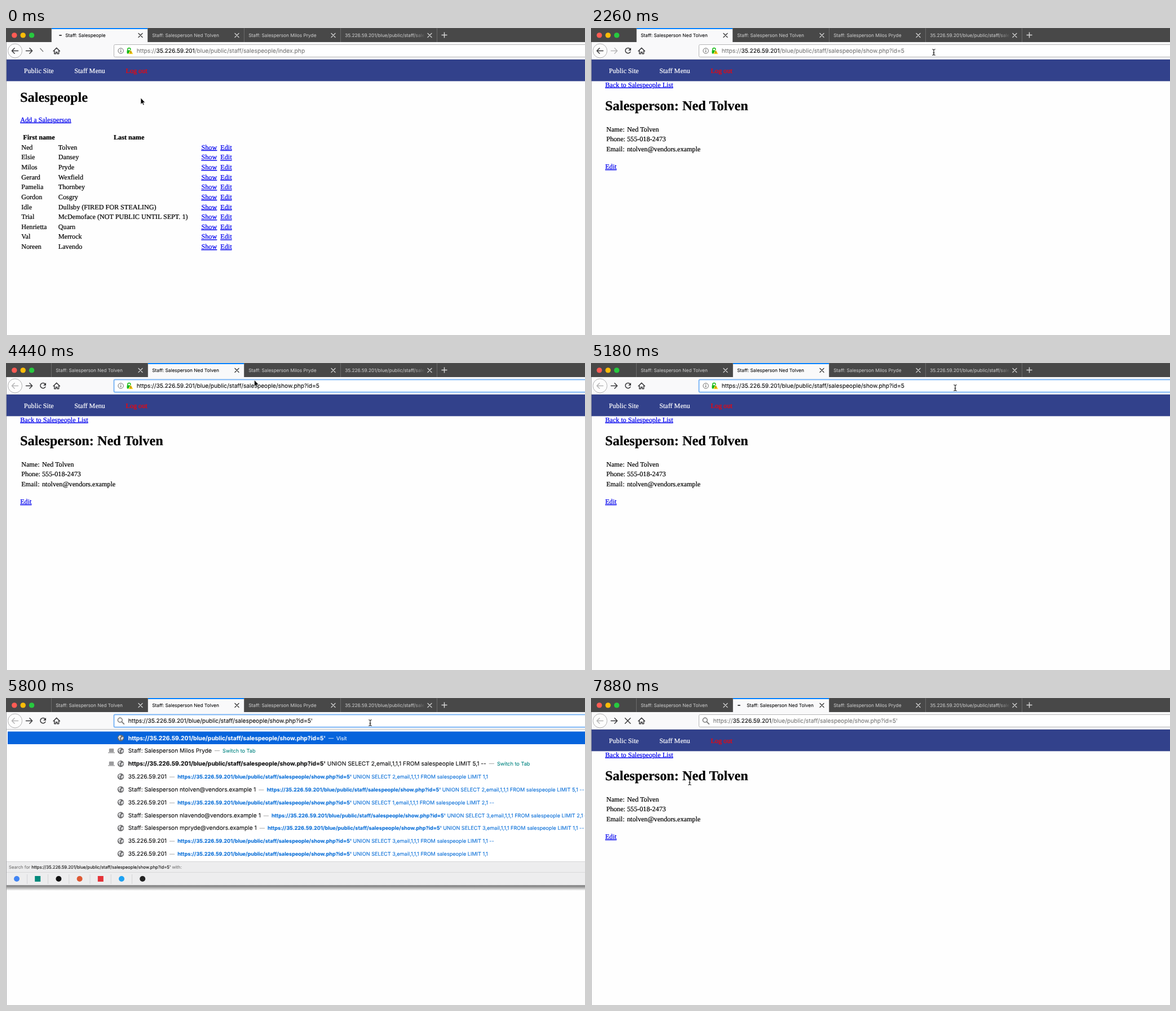
Recreate the animation shown at these times as an HTML page. Size 1027x545 px, loop 8000 ms.

```html
<!DOCTYPE html>
<html lang="en">
<head>
<meta charset="utf-8">
<title>Staff browser</title>
<style>
html, body { margin: 0; width: 100%; height: 100%; overflow: hidden; background: #fefefe; }
svg { display: block; }
text { white-space: pre; text-rendering: geometricPrecision; }
.ui { font-family: Inter, Roboto, sans-serif; stroke-width: .1px; }
.tab { font-size: 8.3px; }
.big { font-size: 10.22px; }
.big .b { font-size: 10.35px; }
.big .small { font-size: 9.13px; }
.tiny { font-size: 7.72px; }
.page { font: 12.15px "Liberation Serif", Times, serif; stroke-width: .22px; }
.h1 { font-size: 24.3px; font-weight: 700; }
.b { font-weight: 700; }
.link { text-decoration: underline; }
.icon { fill: none; stroke: #3b3b3d; stroke-width: 1.5; stroke-linecap: round; stroke-linejoin: round; }
</style>
</head>
<body>
<svg id="stage" width="1027" height="545" viewBox="0 0 1027 545"></svg>
<script>
const stage = document.getElementById('stage');
const LOOP = 8000;
const HOST = '35.226.59.201';
const PATH = '/blue/public/staff/salespeople/';
const SHOW = PATH + 'show.php?id=5';
const person = 'Ned Tolven', mail = 'ntolven@vendors.example';

const people = [
  ['Ned', 'Tolven'], ['Elsie', 'Dansey'], ['Milos', 'Pryde'], ['Gerard', 'Wexfield'],
  ['Pamelia', 'Thornbey'], ['Gordon', 'Cosgry'], ['Idle', 'Dullsby (FIRED FOR STEALING)'],
  ['Trial', 'McDemoface (NOT PUBLIC UNTIL SEPT. 1)'], ['Henrietta', 'Quarn'],
  ['Val', 'Merrock'], ['Noreen', 'Lavendo']
];

const rect = (x, y, w, h, fill, more = '') =>
  `<rect x="${x}" y="${y}" width="${w}" height="${h}" fill="${fill}" ${more}/>`;
const circle = (x, y, r, fill, more = '') =>
  `<circle cx="${x}" cy="${y}" r="${r}" fill="${fill}" ${more}/>`;
const path = (d, more = 'class="icon"') => `<path d="${d}" ${more}/>`;
// A hairline stroke in the fill colour gives the text its slightly heavy smoothing.
const ink = color => `fill="${color}" stroke="${color}"`;
const text = (x, y, s, cls, fill = '#000', more = '') =>
  `<text x="${x}" y="${y}" class="${cls}" ${ink(fill)} ${more}>${s}</text>`;
const span = (s, cls, fill, dx = 0) =>
  `<tspan class="${cls}" ${ink(fill)} dx="${dx}">${s}</tspan>`;
const at = (x, y, s) => `<g transform="translate(${x} ${y})">${s}</g>`;
const page = (x, y, s, cls = '', fill) => text(x, y, s, 'page ' + cls, fill);
const link = (x, y, s) => page(x, y, s, 'link', '#0000ee');

// Each entry changes part of the state at its time.
const steps = [
  [0, { view: 'list', active: 0, spin: 96.5, button: 'tick', back: true, fwd: true, hover: -1,
        path: PATH + 'index.php', focus: false, select: false, caret: false, drop: false,
        search: false, cursor: ['arrow', 239, 124] }],
  [300, { spin: 94, button: 'stop' }],
  [720, { spin: 0, cursor: ['arrow', 247, 124] }],
  [1110, { path: SHOW, fwd: false, spin: 96, button: 'stop' }],
  [1400, { view: 'detail', spin: 94, cursor: ['arrow', 611, 52] }],
  [1700, { spin: 0, button: 'tick', cursor: ['beam', 610, 46] }],
  [2050, { button: 'reload', cursor: ['beam', 609, 45] }],
  [2260, { cursor: ['beam', 608, 43] }],
  [2560, { focus: true, select: true }],
  [2700, { select: false, caret: true }],
  [3000, { cursor: ['beam', 627, 41] }],
  [3175, { cursor: ['arrow', 440, 27] }],
  [3350, { cursor: ['arrow', 323, 15], hover: 1 }],
  [3670, { back: false, fwd: true }],
  [3900, { active: 1, hover: -1 }],
  [5620, { search: true, path: SHOW + "'", drop: true, caret: true }],
  [5800, { caret: false }],
  [6190, { drop: false, focus: false, spin: 265, button: 'arc' }],
  [6580, { button: 'stop', spin: 267, cursor: ['beam', 175, 149] }],
  [6960, { spin: 261.5 }],
  [7290, { spin: 266 }],
  [7590, { spin: 270 }],
  [7880, { spin: 262.5 }]
];
for (let i = 0; i < 7; i++) {
  const p = i / 6, e = 1 - (1 - p) ** 2;
  const x = 350 + 296 * e, y = 24 + 20 * e;
  steps.push([4200 + 980 * p, { cursor: [y > 31 ? 'beam' : 'arrow', x, y], caret: i > 1 && i < 5 }]);
}
steps.sort((a, b) => a[0] - b[0]);

function tabs(s) {
  const who = 'Staff: Salesperson ';
  const names = [s.view === 'list' ? 'Staff: Salespeople' : who + person,
    who + person, who + 'Milos Pryde', HOST + PATH.slice(0, -6)];
  let out = rect(0, 0, 1027, 25, '#484848') + rect(0, 0, 1027, 1, '#525252');
  ['#ff5b54', '#fdbc09', '#27c93f'].forEach((c, i) => out += circle(14.8 + 15.4 * i, 12.9, 4.7, c));
  names.forEach((name, i) => {
    const x = 81 + 171 * i, on = i === s.active;
    if (on) out += rect(x, 0, 171, 25, '#f9f9fa') + rect(x, 0, 171, 2, '#0a84ff');
    else if (i === s.hover) out += rect(x, 0, 171, 25, '#5e5e5e') + rect(x, 0, 171, 1.5, '#858585');
    out += rect(x - 1, 0, 1, 25, '#6a6a6a');
    const shift = on && s.spin ? 17 : 0;
    if (shift) out += rect(s.spin - 2.5, 12, 5, 2, '#444', 'rx="1"');
    out += text(x + 7.2 + shift, 16.3, name, 'ui tab', i === 3 ? 'url(#fade)' : on ? '#0c0c0d' : '#c2c2c2');
    out += path(`M${x + 154} 9.5l7 7m0-7l-7 7`,
      `stroke="${on ? '#333' : '#d4d4d4'}" stroke-width="1.3" stroke-linecap="round"`);
  });
  return out + rect(764, 0, 1, 25, '#6a6a6a') +
    path('M772.5 12.5h10m-5-5v10', 'stroke="#d8d8d8" stroke-width="1.4"');
}

function toolbar(s) {
  const dim = on => `class="icon" style="stroke:${on ? '#3b3b3d' : '#b6b6b7'}"`;
  const buttons = {
    tick: path('M60.5 36l5.5 6', 'stroke="#777" stroke-width="1.3"'),
    stop: path('M60.5 35.8l9.4 9.4m0-9.4l-9.4 9.4'),
    arc: path('M60.5 41a5 5 0 0 1 9.6-1.5', 'fill="none" stroke="#888" stroke-width="1.3"'),
    reload: path('M69.4 37.2a4.7 4.7 0 1 0 .5 5') + path('M71 35v5h-5z', 'fill="#3b3b3d"')
  };
  return rect(0, 25, 1027, 31, '#f9f9fa') + rect(0, 55.4, 1027, .6, '#c5c5c8') +
    circle(16, 40.5, 12.5, '#fdfdfd', 'stroke="#b0b0b1"') +
    path('M21.5 40.5h-11m4.6-4.8l-4.7 4.8l4.7 4.8', dim(s.back)) +
    path('M35.5 40.5h11m-4.6-4.8l4.7 4.8l-4.7 4.8', dim(s.fwd)) +
    buttons[s.button] +
    path('M84 41l5.7-5.6l5.7 5.6m-9.6-.5v5.2h2.7v-3h2.4v3h2.7v-5.2') +
    address(s);
}

function address(s) {
  const x = s.search ? 216.8 : 231.8, grey = s.focus ? '#0c0c0d' : '#777';
  const field = s.focus
    ? rect(191.5, 29.5, 850, 22.3, '#fff', 'rx="2" stroke="#7fb7f5" stroke-width="2"')
    : rect(191.5, 29.5, 850, 22, '#fff', 'rx="2" stroke="#b4b4b5"');
  const icons = s.search
    ? circle(202.3, 39.2, 3.9, 'none', 'stroke="#777" stroke-width="1.5"') +
      path('M205.3 42.2l4 4', 'stroke="#777" stroke-width="1.8" stroke-linecap="round"')
    : circle(203.6, 40.5, 4.7, 'none', 'stroke="#666"') + rect(203, 39.8, 1.3, 3.2, '#666') +
      rect(203, 37.6, 1.3, 1.3, '#666') +
      path('M215.8 40v-2.1a2.5 2.5 0 0 1 5 0v1', 'fill="none" stroke="#12b812" stroke-width="1.5"') +
      rect(214.5, 39.6, 7.5, 6, '#12b812', 'rx="1"') +
      path('M221.3 38.8l4.3 7.4h-8.6z', 'fill="#ffcb00" stroke="#fff" stroke-width=".5"') +
      rect(220.9, 41.2, .9, 2.6, '#554400') + rect(220.9, 44.4, .9, .9, '#554400');
  return field + icons + `<g id="mark"></g>` +
    text(x, 44.2, span('https://', '', grey) + span(HOST, '', '#0c0c0d') + span(s.path, '', grey),
      'ui big', grey, 'id="url"');
}

function content(s) {
  let out = rect(0, 56, 1027, 489, '#fefefe') + rect(0, 56, 1027, 38.4, '#32418b') +
    page(31.8, 79.6, 'Public Site', '', '#fff') + page(121.2, 79.6, 'Staff Menu', '', '#fff') +
    page(212.5, 79.6, 'Log out', '', '#f00');
  if (s.view === 'list') {
    out += page(25, 131, 'Salespeople', 'h1') + link(25.2, 166.8, 'Add a Salesperson') +
      page(30.3, 198.2, 'First name', 'b') + page(191, 198.2, 'Last name', 'b');
    people.forEach(([first, last], i) => {
      const y = 215.8 + 17.62 * i;
      out += page(27.2, y, first) + page(92.8, y, last) +
        link(346.5, y, 'Show') + link(380.3, y, 'Edit');
    });
    return out;
  }
  out += link(25.2, 104.7, 'Back to Salespeople List') +
    page(25, 146, 'Salesperson: ' + person, 'h1');
  [['Name:', person], ['Phone:', '555-018-2473'], ['Email:', mail]].forEach(([k, v], i) => {
    const y = 183.5 + 17.6 * i;
    out += page(27.2, y, k) + page(64, y, v);
  });
  return out + link(25.2, 250, 'Edit');
}

const globe = (x, y) => at(x, y, circle(0, 0, 5.7, '#6c6c6e') +
  path('M-4.6-1l2.4-3.4l2.6.4l-.6 2.4l-2 1.6l1.4 1.8l-1 2.2zM.8-.6l3.2-1.6l1 2.2l-2.8 3.8l-1.6-1.8z',
    'fill="#dcdcde"'));
const laptop = (x, y) => rect(x - 4.2, y - 4, 8.4, 6.5, '#9b9b9d', 'rx="1"') +
  rect(x - 6, y + 2.6, 12, 1.4, '#9b9b9d');

function dropdown() {
  const full = 'https://' + HOST + SHOW + "'", blue = '#0a6fd8', teal = '#008480';
  const union = (n, limit) => ` UNION SELECT ${n},email,1,1,1 FROM salespeople LIMIT ${limit}`;
  const dash = (fill = '#888') => span('—', 'small', fill, 5);
  const go = dash() + span('Switch to Tab', 'small', teal, 5);
  const found = (title, n, limit) => title + dash() +
    span(full, 'small b', blue, 5) + span(union(n, limit), 'small', blue);
  const staff = m => `Staff: Salesperson ${m} 1`;
  const rows = [
    span(full, 'b', '#fff') + dash('#fff') + span('Visit', 'small', '#fff', 5),
    'Staff: Salesperson Milos Pryde' + go,
    span(full, 'b', '#0c0c0d') + union(2, '5,1 --') + go,
    found(HOST, 2, '1,1'),
    found(staff(mail), 2, '5,1 --'),
    found(HOST, 1, '2,1 --'),
    found(staff('nlavendo@vendors.example'), 3, '2,1 --'),
    found(staff('mpryde@vendors.example'), 3, '1,1 --'),
    found(HOST, 3, '1,1 --'),
    found(HOST, 3, '1,1')
  ];
  let out = rect(0, 333, 1027, 9, 'url(#shade)') + rect(0, 56, 1027, 277, '#fff') +
    rect(0, 55.5, 1027, .8, '#bbb') + rect(3, 59.5, 1024, 22.5, '#0664dc');
  rows.forEach((row, i) => {
    const y = 71 + 22.84 * i;
    out += globe(203.5, y) + text(216.8, y + 3.6, row, 'ui big', '#0c0c0d');
    if (i === 1 || i === 2) out += laptop(187, y);
  });
  out += rect(0, 290, 1027, 43, '#ededee') + rect(0, 290, 1027, .8, '#d0d0d2') +
    rect(0, 309, 1027, .8, '#d4d4d6') +
    text(5, 302.6, 'Search for ' + span(full, '', '#111') + ' with:', 'ui tiny', '#777');
  ['#4285f4', '#00897b', '#111', '#de5833', '#e53238', '#1da1f2', '#222'].forEach((c, i) => {
    const x = 19 + 37.2 * i;
    out += i === 1 || i === 4 ? rect(x - 5, 316, 10, 10, c) : circle(x, 321, 5, c);
    if (i < 6) out += rect(x + 18, 313, .8, 17, '#cfcfd1');
  });
  return out + rect(0, 332.2, 1027, 1, '#8b8b8d');
}

function pointer([kind, x, y]) {
  return at(x, y, kind === 'arrow'
    ? path('M0 0v11.5l2.6-2.4l1.8 4l1.8-.8l-1.8-3.9h3.4z', 'fill="#000" stroke="#fff" stroke-width=".7"')
    : path('M-2.8-5.2q2.3 0 2.8 1.2q.5-1.2 2.8-1.2m-2.8 1.2v8m-1.5-3h3m-4.3 4.2q2.3 0 2.8-1.2q.5 1.2 2.8 1.2',
      'fill="none" stroke="#111" stroke-width="1.1"'));
}

const defs = `<defs>
  <linearGradient id="fade" gradientUnits="userSpaceOnUse" x1="722" x2="743" y1="0" y2="0">
    <stop stop-color="#c2c2c2"/><stop offset="1" stop-color="#c2c2c2" stop-opacity="0"/></linearGradient>
  <linearGradient id="shade" x2="0" y2="1">
    <stop stop-color="#777"/><stop offset="1" stop-color="#fefefe"/></linearGradient></defs>`;

function draw(s) {
  stage.innerHTML = defs + content(s) + tabs(s) + toolbar(s) + (s.drop ? dropdown() : '') +
    rect(0, 25, 1, 520, '#a9a9ab') + pointer(s.cursor);
  const url = document.getElementById('url');
  const x = +url.getAttribute('x'), w = url.getComputedTextLength();
  document.getElementById('mark').innerHTML =
    (s.select ? rect(x, 34, w, 14, '#b2d6fd') : '') +
    (s.caret ? rect(x + w + .3, 34.5, .9, 12.5, '#000') : '');
}

let shown = -1;
function tick() {
  const time = performance.now() % LOOP;
  const count = steps.filter(step => step[0] <= time).length;
  if (count !== shown) {
    shown = count;
    draw(Object.assign({}, ...steps.slice(0, count).map(step => step[1])));
  }
  requestAnimationFrame(tick);
}
tick();
</script>
</body>
</html>
```
